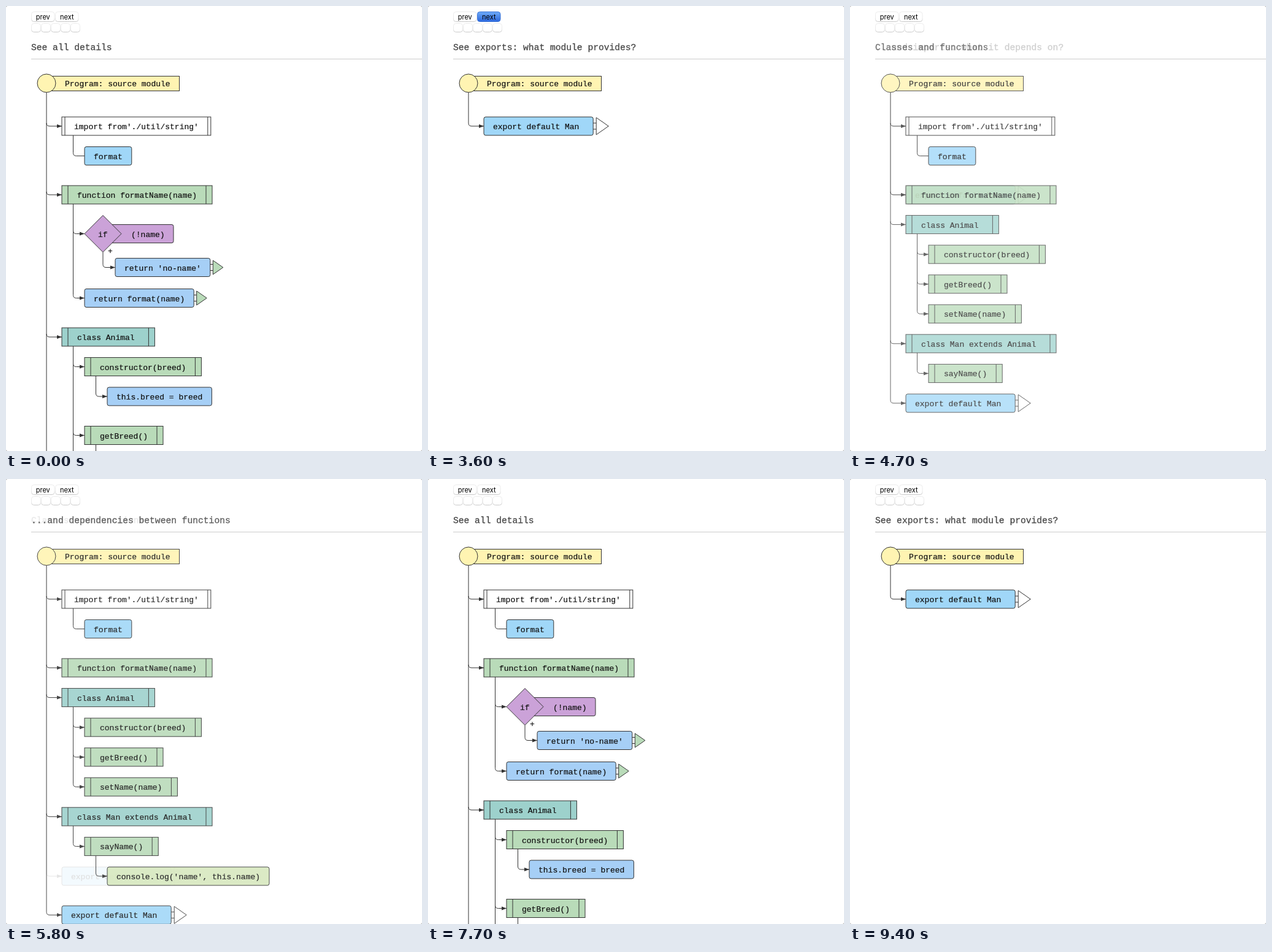
Write an HTML page that moves like this. It is 678 px wide and 726 px high and loops after 9500 ms.

```html
<!DOCTYPE html>
<html lang="en">
<head>
<meta charset="utf-8">
<style>
  html, body { margin: 0; width: 100%; height: 100%; overflow: hidden; background: #aaa; }
  svg { display: block; width: 678px; height: 726px; background: #fff; border-radius: 3px; }
  text { white-space: pre; }
  .code { font: 13px "Courier New", "Liberation Mono", monospace; fill: #111; stroke: #111; stroke-width: .2; }
  .title { font: 14.63px "Courier New", "Liberation Mono", monospace; fill: #484848; stroke: #484848; stroke-width: .3; }
  .button { font: 11px Inter, sans-serif; text-anchor: middle; }
  .shape { stroke: #333; stroke-width: 1; }
  .line { stroke: #333; fill: none; }
</style>
</head>
<body>
<svg id="stage" viewBox="0 0 678 726">
  <defs>
    <linearGradient id="blue" x2="0" y2="1">
      <stop stop-color="#6fabf8"/><stop offset="1" stop-color="#2b66dc"/>
    </linearGradient>
    <linearGradient id="rim" x2="0" y2="1">
      <stop offset=".6" stop-color="#ececec"/><stop offset="1" stop-color="#cacaca"/>
    </linearGradient>
  </defs>
</svg>
<script>
const stage = document.getElementById('stage');
const CHAR = 7.8;
const GREEN = '#b9dbb9';

function add(parent, tag, attrs, content) {
  const node = document.createElementNS('http://www.w3.org/2000/svg', tag);
  for (const key in attrs) node.setAttribute(key, attrs[key]);
  if (content !== undefined) node.textContent = content;
  parent.append(node);
  return node;
}
const path = (g, d, fill) => add(g, 'path', fill ? { d, fill, class: 'shape' } : { d, class: 'line' });
const label = (g, x, y, text) => add(g, 'text', { x, y, class: 'code' }, text);
const box = (g, x, y, width, height, fill, rx = 0) =>
  add(g, 'rect', { x, y, width, height, fill, rx, class: 'shape' });

// pad: text inset, bar: inner side lines, extra: trailing characters, tip: exit arrow [length, half height, gap, fill]
const KINDS = {
  import: { fill: '#fff', pad: 20, bar: 5 },
  func: { fill: GREEN, pad: 25, bar: 10 },
  class: { fill: '#9dd1cc', pad: 25, bar: 10, extra: 1 },
  name: { fill: '#a0d7f8', pad: 15, plain: true },
  return: { fill: '#a6cff6', pad: 15, tip: [16.5, 11.5, 4.5, GREEN] },
  assign: { fill: '#a6cff6', pad: 15 },
  call: { fill: '#d7e8be', pad: 15 },
  export: { fill: '#a0d7f8', pad: 15, extra: 1, tip: [20, 14, 5, '#fff'] }
};

function drawNode(g, [kind, x, y, text]) {
  if (kind === 'if') {
    box(g, x + 30, y + 15, 115, 30, '#cba2d8', 3);
    path(g, `M${x} ${y + 30}l30 -30 30 30 -30 30z`, '#cba2d8');
    label(g, x + 22, y + 35, 'if');
    label(g, x + 76, y + 35, text);
    label(g, x + 38, y + 62, '+');
    return;
  }
  const { fill, pad, bar, extra = 0, tip } = KINDS[kind];
  const right = x + (text.length + extra) * CHAR + 2 * pad, mid = y + 15;
  box(g, x, y, right - x, 30, fill, bar ? 0 : 3);
  if (bar) path(g, `M${x + bar} ${y}v30M${right - bar} ${y}v30`);
  if (tip) {
    const [length, half, gap, color] = tip;
    path(g, `M${right} ${mid - 5}h${gap}M${right} ${mid + 5}h${gap}`);
    path(g, `M${right + gap} ${mid - half}l${length} ${half} ${-length} ${half}z`, color);
  }
  label(g, x + pad, y + 20, text);
}

// Lines from a parent to its children; a parent is the nearest earlier node further left.
function drawLinks(g, nodes) {
  nodes.forEach((parent, i) => {
    const [kind, x, y] = parent;
    const from = kind === 'root' ? [66, 141] : kind === 'if' ? [x + 30, y + 60] : [x + 18.5, y + 30];
    const kids = nodes.filter((kid, k) =>
      k > i && parent === nodes.slice(0, k).findLast(n => n[1] < kid[1]));
    if (!kids.length) return;
    const centre = kid => kid[2] + (kid[0] === 'if' ? 30 : 15);
    path(g, `M${from}V${centre(kids.at(-1)) - 5}`);
    for (const kid of kids) {
      const cy = centre(kid), kx = kid[1];
      path(g, `M${from[0]} ${cy - 5}q0 5 5 5H${kx}`);
      if (!KINDS[kid[0]]?.plain) add(g, 'path', { d: `M${kx} ${cy}l-8 -3v6z`, fill: '#333' });
    }
  });
}

function drawSlide(title, nodes) {
  const g = add(stage, 'g', { opacity: 0 });
  add(g, 'text', { x: 41, y: 72, class: 'title' }, title);
  drawLinks(g, [['root', 51, 111], ...nodes]);
  box(g, 66, 114.5, 216.5, 24, '#fff4b2');
  add(g, 'circle', { cx: 66, cy: 126, r: 15, fill: '#fff4b2', class: 'shape' });
  label(g, 96, 131, 'Program: source module');
  nodes.forEach(node => drawNode(g, node));
  return g;
}

const row = n => 293 + 48.57 * n;
const exportAt = y => ['export', 91, y, 'export default Man'];
const imports = [['import', 91, 181, "import from'./util/string'"], ['name', 128, 229.6, 'format']];
const formatName = ['func', 91, row(0), 'function formatName(name)'];
const classes = [
  ...imports, formatName,
  ['class', 91, row(1), 'class Animal'],
  ['func', 128, row(2), 'constructor(breed)'],
  ['func', 128, row(3), 'getBreed()'],
  ['func', 128, row(4), 'setName(name)'],
  ['class', 91, row(5), 'class Man extends Animal'],
  ['func', 128, row(6), 'sayName()']
];

const slides = [
  drawSlide('See exports: what module provides?', [exportAt(181)]),
  drawSlide('...and imports: what it depends on?', [...imports, exportAt(293)]),
  drawSlide('Classes and functions', [...classes, exportAt(row(7))]),
  drawSlide('...and dependencies between functions', [
    ...classes, ['call', 165, row(7), "console.log('name', this.name)"], exportAt(696.3)
  ]),
  drawSlide('See all details', [
    ...imports, formatName,
    ['if', 128, row(1), '(!name)'],
    ['return', 178, 411.5, "return 'no-name'"],
    ['return', 128, 461.5, 'return format(name)'],
    ['class', 91, 525, 'class Animal'],
    ['func', 128, 573.5, 'constructor(breed)'],
    ['assign', 165, 622, 'this.breed = breed'],
    ['func', 128, 685.5, 'getBreed()'],
    ['return', 165, 734, 'return this.breed'],
    ['func', 128, 798, 'setName(name)'],
    exportAt(1100)
  ])
];

function drawButton(x, y, width, height, text) {
  const face = add(stage, 'rect', { x, y, width, height, rx: 4, fill: '#fff', stroke: 'url(#rim)' });
  if (text) add(stage, 'text', { x: x + width / 2, y: 22, class: 'button' }, text);
  return face;
}
drawButton(41.5, 9.5, 37.5, 16, 'prev');
const next = drawButton(80.5, 9.5, 37.5, 16, 'next');
for (let i = 0; i < 5; i++) drawButton(41.5 + 16 * i, 28.5, 15, 14);
add(stage, 'path', { d: 'M41 86.5H678', stroke: '#ccc' });

// [start of the cross-fade, slide it leads to, whether the button press shows]
const changes = [
  [2080, 0, false], [3700, 1, true], [4380, 2, true],
  [5370, 3, true], [6800, 4, false], [8350, 0, true]
];
const FADE = 700, LOOP = 9500, STEP = 100;

function render(now) {
  const t = Math.floor(now % LOOP / STEP) * STEP;
  const opacity = [0, 0, 0, 0, 1];
  let pressed = false;
  for (const [start, target, shown] of changes) {
    if (shown && t >= start - STEP && t < start) pressed = true;
    if (t < start) continue;
    const p = 1 - (1 - Math.min(1, (t - start) / FADE)) ** 2.2;
    opacity.forEach((o, i) => { opacity[i] = o * (1 - p) + (i === target ? p : 0); });
  }
  slides.forEach((g, i) => {
    g.setAttribute('opacity', opacity[i]);
    g.setAttribute('display', opacity[i] ? 'inline' : 'none');
  });
  next.setAttribute('fill', pressed ? 'url(#blue)' : '#fff');
  next.setAttribute('stroke', pressed ? '#3a74d8' : 'url(#rim)');
}

const begin = performance.now();
function tick() {
  render(performance.now() - begin);
  requestAnimationFrame(tick);
}
tick();
</script>
</body>
</html>
```
